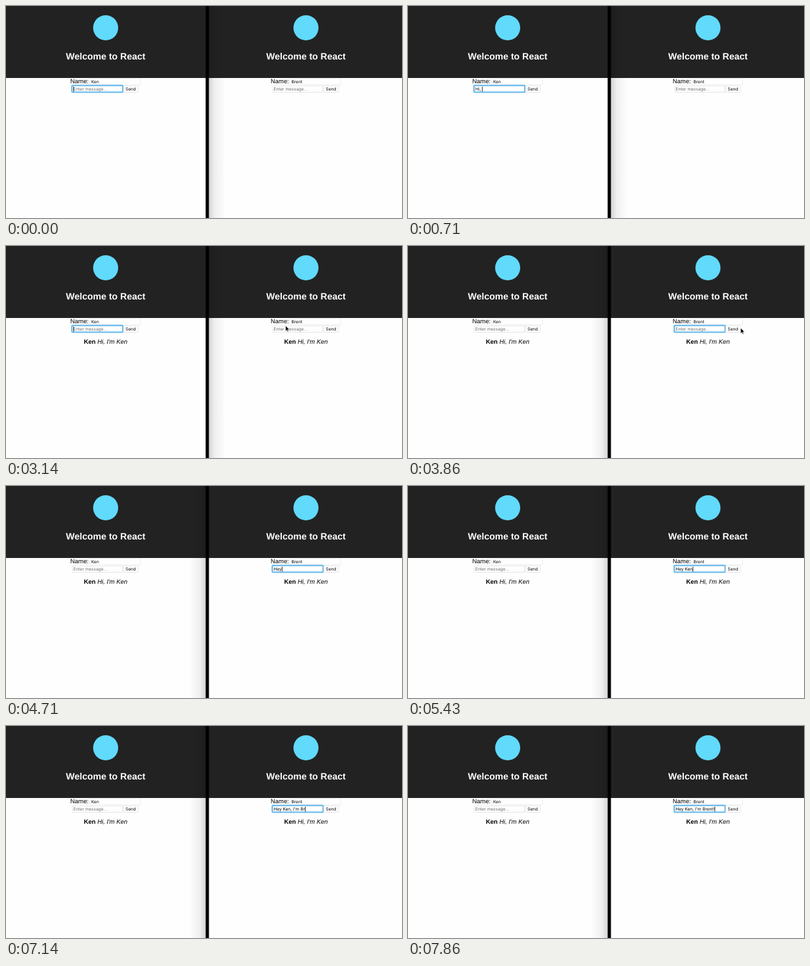
These frames come from a looping animation (600x321 px, 8 s). An HTML page:

```html
<!DOCTYPE html>
<html lang="en">
<head>
<meta charset="utf-8">
<title>Chat demo</title>
<style>
  html, body { margin: 0; width: 100%; height: 100%; overflow: hidden; background: #fefefe; }
  svg { display: block; width: 100%; height: 100%; }
  text { font: 9.4px "Liberation Sans", Arial, sans-serif; white-space: pre; text-rendering: geometricPrecision; }
  .title { font-size: 14px; font-weight: bold; fill: #fff; text-anchor: middle; }
  .ui { font: 6.5px Inter, Roboto, sans-serif; }
  .hint { fill: #6c6c6c; }
  .msg { text-anchor: middle; }
  .box { fill: #fff; stroke: #dcdcdc; stroke-width: .7; }
  .soft { stroke: #e6e6e6; }
  .ring { fill: none; stroke: #62b8ec; stroke-width: 2; }
</style>
</head>
<body>
<svg viewBox="0 0 600 321" preserveAspectRatio="none">
  <defs>
    <linearGradient id="shade">
      <stop offset="0" stop-color="#000" stop-opacity=".16"/>
      <stop offset=".35" stop-color="#000" stop-opacity=".06"/>
      <stop offset="1" stop-color="#000" stop-opacity="0"/>
    </linearGradient>
  </defs>
  <rect width="600" height="321" fill="#fefefe"/>
  <rect width="600" height="109" fill="#222"/>
  <g id="panes"></g>
  <rect id="shadow" width="25" height="321" fill="url(#shade)"/>
  <rect x="302.5" width="5" height="321" fill="#000"/>
  <path id="pointer" d="M0 0V8.4L1.9 6.7L3.2 9.6L4.6 9L3.3 6.2H5.9Z" fill="#000" stroke="#fff" stroke-width=".6"/>
</svg>
<script>
const LOOP = 8000, TICK = 1000 / 7;
const SENT = 15, SWITCH = 23;
const $ = id => document.getElementById(id);

// Each user: name, horizontal offset, typed line and the tick of each key press.
const users = [
  { name: "Ken", x: 0, line: "Hi, I'm Ken",
    keys: [2, 3, 4, 5, 7, 8, 9, 10, 11, 12, 13] },
  { name: "Brent", x: 303.5, line: "Hey Ken, I'm Brent!",
    keys: [29, 31, 32, 34, 35, 37, 38, 40, 41, 43, 45, 46, 48, 49, 50, 51, 52, 53, 55] }
];

// Pointer positions, one per tick.
const MOVE_START = 20, MOVE_END = 29;
const path = [[330, 150], [390, 129], [423.5, 120.5], [440, 123], [504, 124]];

const pane = u => `<g transform="translate(${u.x})">
  <circle cx="151" cy="33" r="19" fill="#61dafb"/>
  <text class="title" x="151" y="81">Welcome to React</text>
  <text x="97.6" y="117">Name:</text>
  <rect class="box soft" x="126.5" y="109.3" width="77" height="10"/>
  <text class="ui" x="129" y="117">${u.name}</text>
  <rect class="box" x="100.8" y="121" width="75.5" height="9.6"/>
  <rect class="ring" x="99.9" y="120.2" width="77.2" height="10.4" rx="1"/>
  <text class="ui entry" x="102" y="128.2"></text>
  <rect class="caret" y="122.2" width=".8" height="7.4"/>
  <rect class="box" x="178" y="121" width="22.5" height="9.6" rx=".8"/>
  <text class="ui" x="181" y="128.2">Send</text>
  <text class="msg" x="151" y="148.4"><tspan font-weight="bold">${users[0].name}</tspan> <tspan font-style="italic">${users[0].line}</tspan></text>
</g>`;

$("panes").innerHTML = users.map(pane).join("");
users.forEach((u, i) => {
  const g = $("panes").children[i];
  for (const part of ["ring", "entry", "caret", "msg"]) u[part] = g.querySelector("." + part);
});

const show = (el, on) => el.setAttribute("visibility", on ? "visible" : "hidden");

function drawPane(u, i, tick) {
  const focused = (tick >= SWITCH) === (i === 1);
  const sent = tick >= SENT;
  const cleared = i === 0 && sent;
  const count = cleared ? 0 : u.keys.filter(k => k <= tick).length;
  const since = cleared ? SENT : count ? u.keys[count - 1] : i ? SWITCH : 0;

  u.entry.textContent = count ? u.line.slice(0, count) : "Enter message...";
  u.entry.classList.toggle("hint", !count);
  const end = count ? u.entry.getComputedTextLength() : 0;
  u.caret.setAttribute("x", 102.2 + end);
  show(u.ring, focused);
  show(u.caret, focused && (tick - since) % 7 < 4);
  show(u.msg, sent);
}

function draw(time) {
  const tick = Math.floor((time % LOOP + 5) / TICK) % 56;
  users.forEach((u, i) => drawPane(u, i, tick));

  const right = tick >= SWITCH;
  $("shadow").setAttribute("transform", right ? "translate(302.5) scale(-1 1)" : "translate(307.5)");

  const step = Math.max(0, Math.min(tick - MOVE_START, path.length - 1));
  $("pointer").setAttribute("transform", `translate(${path[step]})`);
  show($("pointer"), tick >= MOVE_START && tick < MOVE_END);
}

const start = performance.now();
function loop() {
  draw(performance.now() - start);
  requestAnimationFrame(loop);
}
loop();
</script>
</body>
</html>
```
